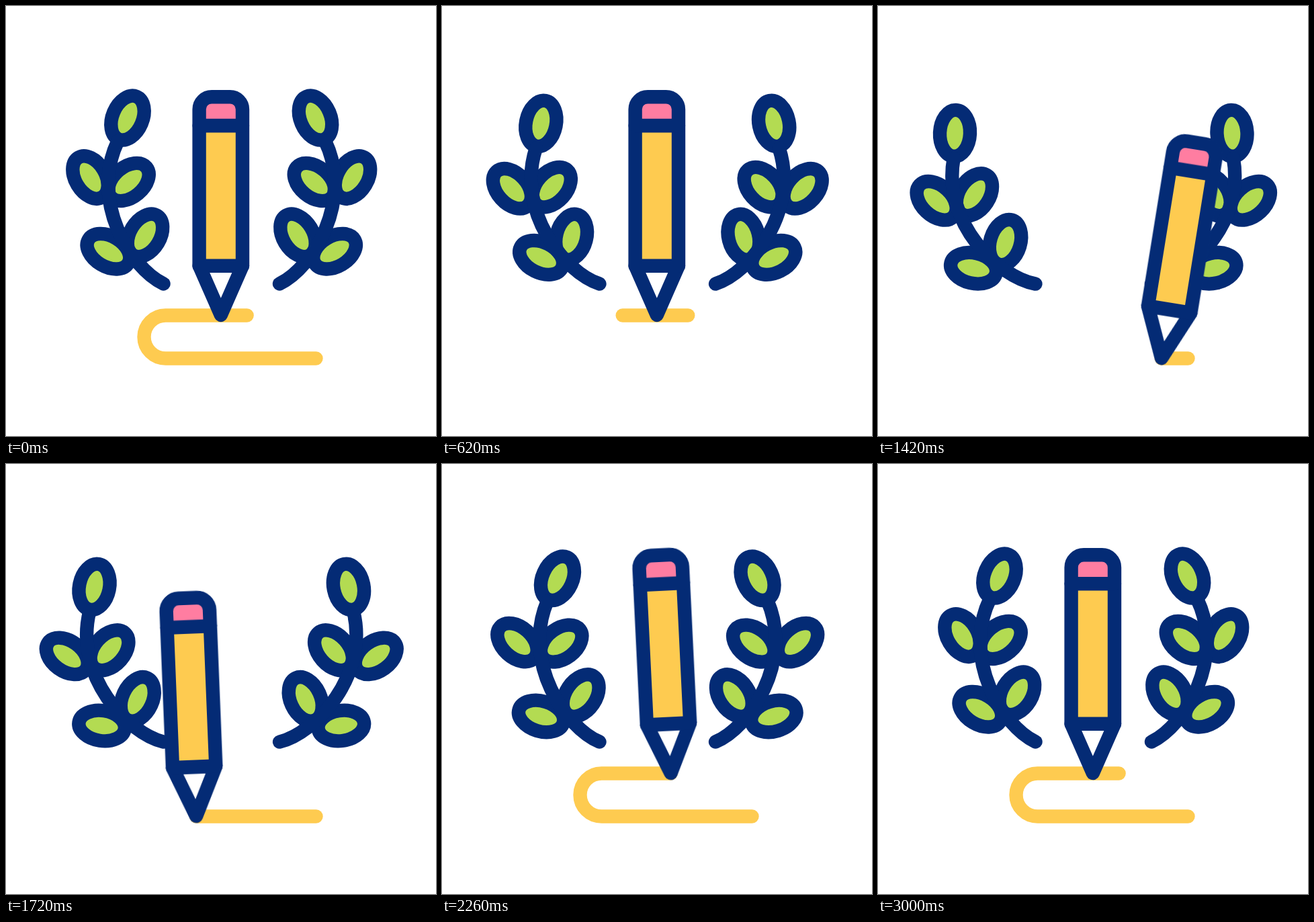
An HTML page for the animation above (3220 ms loop, 640 by 640 pixels).

```html
<!DOCTYPE html>
<html lang="en">
<head>
<meta charset="utf-8">
<title>Pencil and laurel</title>
<style>
  @property --tail { syntax: "<length>"; inherits: false; initial-value: 0px; }
  @property --head { syntax: "<length>"; inherits: false; initial-value: 0px; }

  :root {
    --navy: #042b75;
    --yellow: #fecb50;
    --green: #b3db52;
    --pink: #ff7da1;
    --loop: 3.22s cubic-bezier(.3333, 0, .6667, 1) infinite;
  }
  html, body { margin: 0; width: 100%; height: 100%; overflow: hidden; background: #fff; }
  svg {
    display: block; width: 100%; height: 100%;
    fill: none; stroke: var(--navy); stroke-width: 20.4;
    stroke-linecap: round; stroke-linejoin: round;
  }

  /* Laurel branches: the whole branch sways, each leaf flaps on its base */
  .branch { transform-origin: 235px 414px; animation: sway var(--loop); }
  .leaf { fill: var(--green); transform-origin: 0 0; animation: flap var(--loop); }
  @keyframes sway {
    0%, 80.745%, 100% { rotate: 0deg; }
    40.373% { rotate: -15.7deg; }
  }
  @keyframes flap {
    0%, 77.64%, 100% { rotate: 0deg; }
    15.528% { rotate: var(--a); }
    31.056% { rotate: var(--b); }
    46.584% { rotate: var(--c); }
    62.112% { rotate: var(--d); }
  }

  /* Strokes showing only the part between tail and head */
  .trim {
    stroke: var(--yellow);
    stroke-dasharray: max(0px, calc(var(--head) - var(--tail))) 999px;
    stroke-dashoffset: calc(-1 * var(--tail));
  }
  .line { animation: line-tail var(--loop), line-head var(--loop), line-show var(--loop); }
  @keyframes line-tail {
    0% { --tail: 0px; }
    27.95%, 37.267% { --tail: 461px; }
    37.268%, 100% { --tail: 0px; }
  }
  @keyframes line-head {
    0% { --head: 445.5px; }
    37.267% { --head: 460px; }
    37.268% { --head: 0px; }
    74.534%, 80.745% { --head: 444px; }
    93.168%, 100% { --head: 445.5px; }
  }
  @keyframes line-show {
    0%, 37.3% { opacity: 1; animation-timing-function: step-end; }
    27.75% { opacity: 0; animation-timing-function: step-end; }
    100% { opacity: 1; }
  }
  .spark { animation: spark-tail var(--loop), spark-head var(--loop), spark-show var(--loop); }
  @keyframes spark-tail {
    0%, 76.398% { --tail: 0px; }
    83.54%, 100% { --tail: 42px; }
  }
  @keyframes spark-head {
    0%, 74.534% { --head: 0px; }
    80.745%, 100% { --head: 42px; }
  }
  @keyframes spark-show {
    0%, 83.5% { opacity: 0; animation-timing-function: step-end; }
    74.6% { opacity: 1; animation-timing-function: step-end; }
    100% { opacity: 0; }
  }

  /* Pencil: its tip is the origin and follows the written line */
  .pencil {
    offset-path: path("M319.8 460.4L461.5 524.5H237.5A32 32 0 0 1 237.5 460.5H357H319.8");
    offset-rotate: 0deg;
    offset-anchor: 0 0;
    transform-origin: 0 0;
    animation: write var(--loop);
  }
  .tilt { transform-origin: 0 0; animation: tilt var(--loop); }
  @keyframes write {
    0%, 21.739% { offset-distance: 0px; }
    37.267% { offset-distance: 155.5px; }
    74.534%, 80.745% { offset-distance: 599.5px; }
    93.168%, 100% { offset-distance: 636.7px; }
  }
  @keyframes tilt {
    0%, 21.739% { rotate: 0deg; }
    31.056%, 41.615% { rotate: 10deg; }
    62.112% { rotate: -10deg; }
    74.534%, 100% { rotate: 0deg; }
  }
</style>
</head>
<body>
<svg viewBox="0 0 640 640">
  <g id="left">
    <g class="branch">
      <g transform="translate(167.5 198.3) rotate(23)">
        <ellipse class="leaf" cy="-34.5" rx="22.5" ry="34.5" style="--a:-6.5deg;--b:8.5deg;--c:-6deg;--d:9deg"/>
      </g>
      <g transform="translate(143.3 284.6) rotate(-31)">
        <ellipse class="leaf" cy="-34.5" rx="22.5" ry="34.5" style="--a:.9deg;--b:-31deg;--c:1.6deg;--d:-29.5deg"/>
      </g>
      <g transform="translate(156.1 284.2) rotate(50)">
        <ellipse class="leaf" cy="-34.5" rx="22.5" ry="34.5" style="--a:-2.7deg;--b:11.3deg;--c:-2.6deg;--d:11.6deg"/>
      </g>
      <g transform="translate(189.2 371) rotate(31)">
        <ellipse class="leaf" cy="-34.5" rx="22.5" ry="34.5" style="--a:-13deg;--b:11.7deg;--c:.5deg;--d:12.6deg"/>
      </g>
      <g transform="translate(182 383) rotate(-59)">
        <ellipse class="leaf" cy="-34.5" rx="22.5" ry="34.5" style="--a:7.4deg;--b:-21.2deg;--c:-1.2deg;--d:-24.4deg"/>
      </g>
      <path d="M234.5 413.5C185 390 124 290 166.5 201"/>
    </g>
  </g>
  <g id="right" transform="translate(641.5 0) scale(-1 1)"></g>

  <path class="trim line" d="M461.5 524.5H237.5A32 32 0 0 1 237.5 460.5H380"/>

  <path class="trim spark" d="M357.3 99V57"/>
  <path class="trim spark" d="M290 130.1L254.2 108.2"/>
  <path class="trim spark" d="M424 129L459 105.5"/>

  <g class="pencil">
    <g class="tilt">
      <path fill="#fff" d="M-32.2 -73.7L0 -.4L32.2 -73.7Z"/>
      <path fill="var(--yellow)" d="M-32.2 -282.4H32.2V-73.7H-32.2Z"/>
      <path fill="var(--pink)" d="M-32.2 -282.4V-306.6A18.6 18.6 0 0 1 -13.6 -325.2H13.6A18.6 18.6 0 0 1 32.2 -306.6V-282.4Z"/>
    </g>
  </g>
</svg>
<script>
  // The right branch mirrors the left one.
  const branch = document.querySelector(".branch");
  document.getElementById("right").append(branch.cloneNode(true));
</script>
</body>
</html>
```
